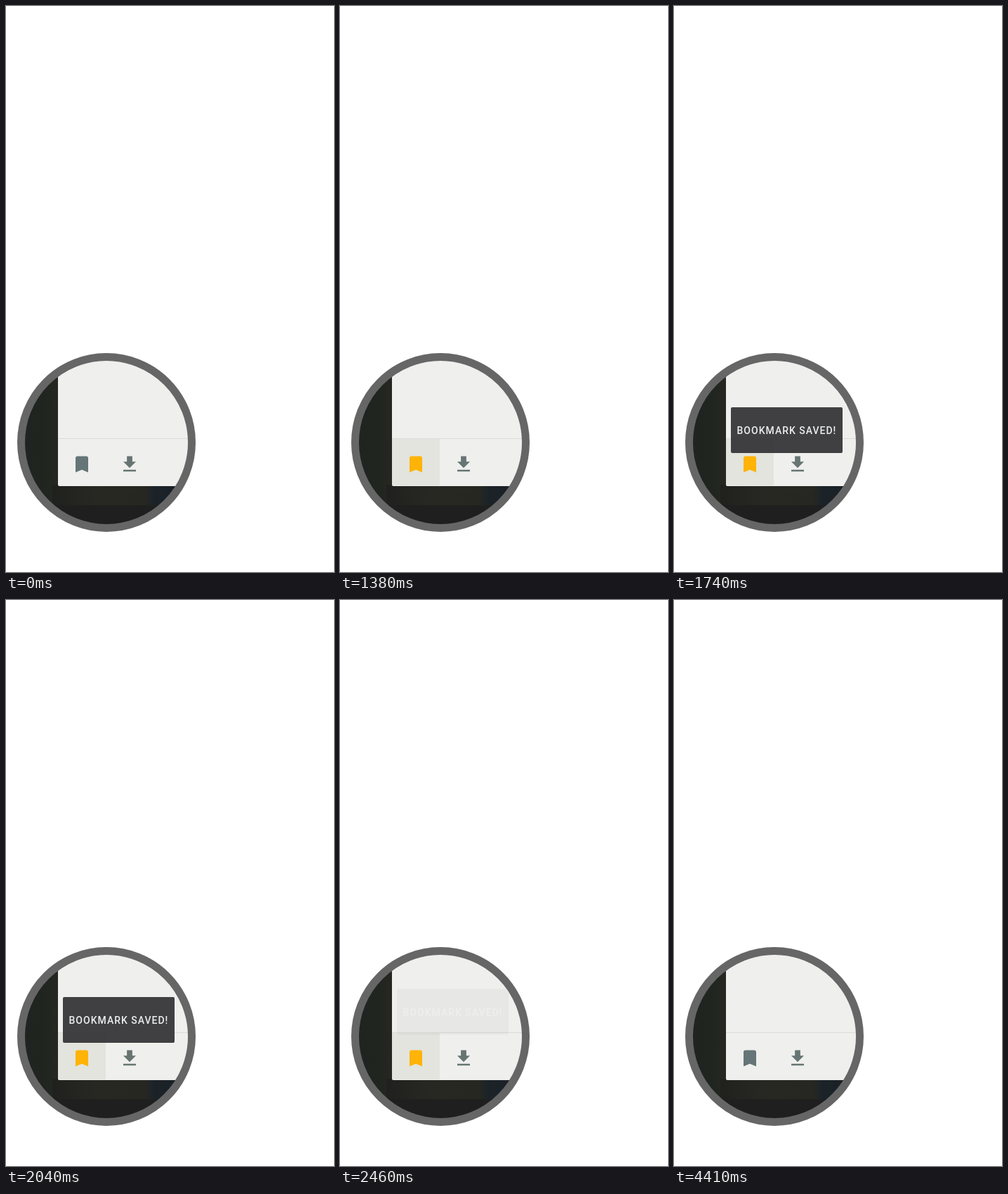
Write an HTML page that moves like this. It is 467 px wide and 804 px high and loops after 4.44 s.

```html
<!DOCTYPE html>
<html lang="en">
<head>
<meta charset="utf-8">
<title>Bookmark saved</title>
<style>
  html, body { margin: 0; width: 100%; height: 100%; overflow: hidden; background: #fff; }
  svg { display: block; }
  text { font: 500 14px Roboto, sans-serif; letter-spacing: 1px; fill: #eceeee; }
</style>
</head>
<body>
<svg width="467" height="804" viewBox="0 0 467 804">
  <defs>
    <clipPath id="lens"><circle cx="143" cy="620" r="117"/></clipPath>
    <linearGradient id="side">
      <stop offset="0" stop-color="#1f2422"/>
      <stop offset=".6" stop-color="#20251f"/>
      <stop offset="1" stop-color="#272722"/>
    </linearGradient>
    <linearGradient id="strip">
      <stop offset="0" stop-color="#20211e"/>
      <stop offset=".35" stop-color="#282823"/>
      <stop offset=".68" stop-color="#272722"/>
      <stop offset=".75" stop-color="#1b2329"/>
      <stop offset="1" stop-color="#1b2024"/>
    </linearGradient>
  </defs>
  <g clip-path="url(#lens)">
    <rect x="26" y="503" width="234" height="234" fill="#1f1f1f"/>
    <rect x="26" y="503" width="48" height="206" fill="url(#side)"/>
    <rect x="66" y="680" width="194" height="29" fill="url(#strip)"/>
    <rect x="74" y="490" width="200" height="192" rx="2" fill="#efefed"/>
    <rect id="hover" x="74" y="615" width="68" height="66" fill="#e2e4dd"/>
    <rect x="74" y="614" width="200" height="1" fill="#dbdddb"/>
    <path id="bookmark" d="M17 3H7c-1.1 0-2 .9-2 2v16l7-3 7 3V5c0-1.1-.9-2-2-2z"/>
    <path transform="translate(176 651) scale(1.286) translate(-12 -12)" fill="#667573"
      d="M19 9h-4V3H9v6H5l7 7 7-7zM5 18v2h14v-2H5z"/>
    <g id="toast">
      <rect x="81" width="159" height="65" rx="2" fill="#323234"/>
      <text x="89.5" y="38">BOOKMARK SAVED!</text>
    </g>
  </g>
  <circle cx="143" cy="620" r="121.5" fill="none" stroke="#666667" stroke-width="11"/>
</svg>
<script>
const LOOP = 4440, STEP = 30;
const GREY = [101, 117, 120], DARK = [55, 70, 76], YELLOW = [255, 179, 6];
const [hover, bookmark, toast] = ["hover", "bookmark", "toast"].map(id => document.getElementById(id));

const progress = (t, from, to) => Math.min(1, Math.max(0, (t - from) / (to - from)));
const smooth = p => p * p * (3 - 2 * p);
const mix = (a, b, p) => a.map((v, i) => Math.round(v + (b[i] - v) * p));

function draw(t) {
  const hovered = progress(t, 360, 750) - progress(t, 4290, 4410);
  const pop = progress(t, 930, 1380);
  const saved = t < 3540 ? progress(pop, 0, 0.5) : 0;
  const scale = 1.286 * (1 + 0.5 * Math.sin(Math.PI * pop));
  hover.setAttribute("opacity", hovered);
  bookmark.setAttribute("fill", `rgb(${mix(mix(GREY, DARK, hovered), YELLOW, saved)})`);
  bookmark.setAttribute("transform", `translate(108 651) scale(${scale}) translate(-12 -12)`);

  const rise = smooth(progress(t, 1500, 1980));
  const leave = smooth(progress(t, 2040, 2520));
  const shown = progress(t, 1470, 1740) * (1 - leave);
  toast.setAttribute("transform", `translate(0 ${576 - 12 * (rise + leave)})`);
  toast.setAttribute("opacity", 0.92 * shown);
}

const start = performance.now();
function tick() {
  const t = (performance.now() - start) % LOOP;
  draw(Math.floor(t / STEP) * STEP);
  requestAnimationFrame(tick);
}
tick();
</script>
</body>
</html>
```
